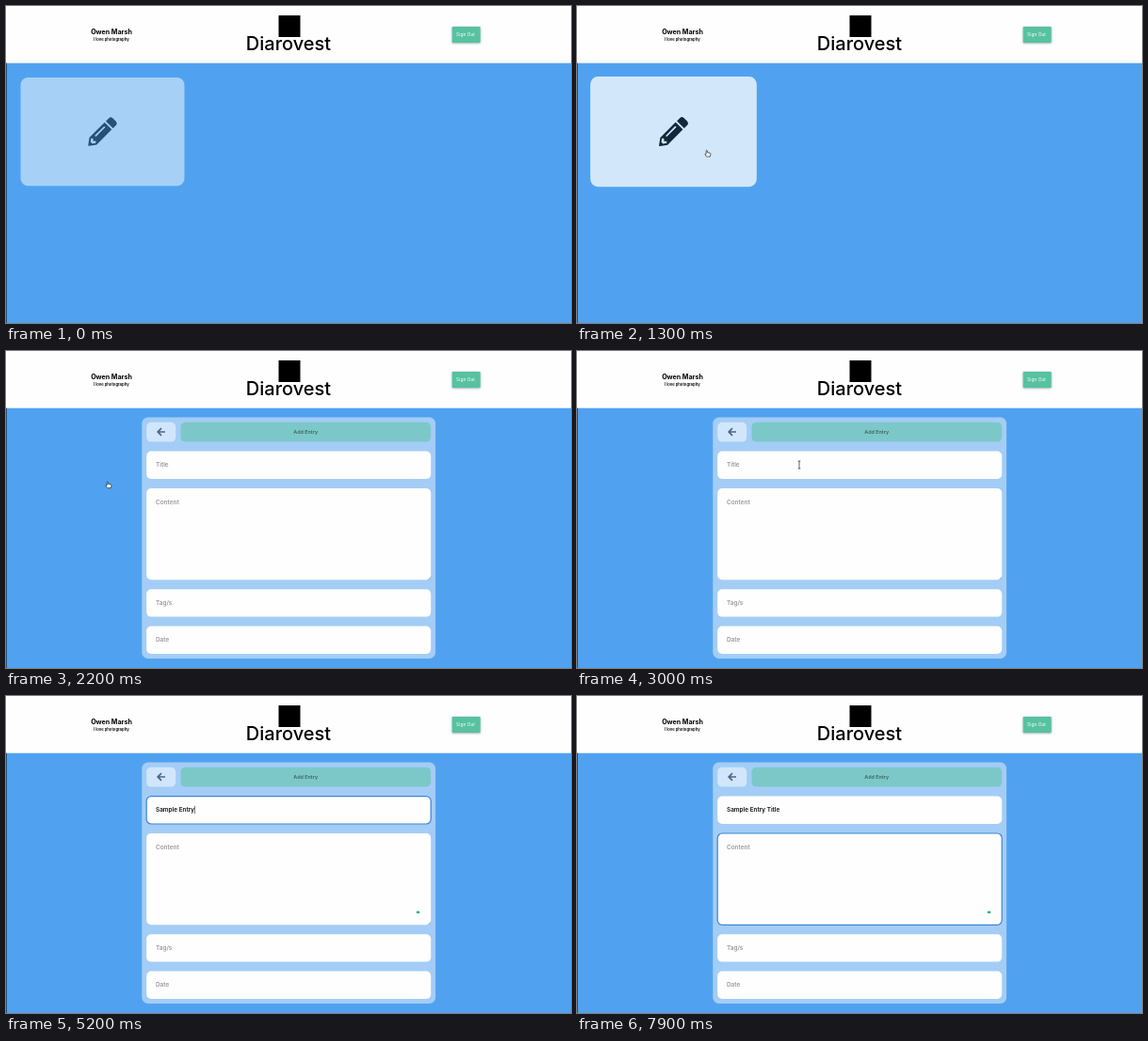
Recreate the animation shown at these times as an HTML page. Size 600x337 px, loop 8000 ms.

```html
<!DOCTYPE html>
<html lang="en">
<head>
<meta charset="utf-8">
<title>Journal entry</title>
<style>
html, body { margin: 0; height: 100%; overflow: hidden; background: #50a2f0; }
svg { display: block; width: 100vw; height: 100vh; }
text { font-family: Inter, "Open Sans", sans-serif; white-space: pre; }
.mid { text-anchor: middle; }
.field rect { fill: #fefefe; }
.field text { font-size: 6.4px; font-weight: 600; fill: #999; }
.focus { fill: none; stroke: #3f83d4; stroke-width: 1.2; }
</style>
</head>
<body>
<svg viewBox="0 0 600 337">
  <defs>
    <filter id="shadow" x="-20%" y="-20%" width="140%" height="150%">
      <feDropShadow dx="0" dy=".6" stdDeviation=".8" flood-opacity=".4"/>
    </filter>
  </defs>
  <rect width="600" height="337" fill="#50a2f0"/>
  <rect width="600" height="60.7" fill="#fefefe"/>
  <rect width=".8" y="60.7" height="277" fill="#1d3a56"/>

  <text class="mid" x="112" y="29.6" font-size="7.1" font-weight="700">Owen Marsh</text>
  <text class="mid" x="111.8" y="37" font-size="4.2" font-weight="600">I love photography</text>
  <rect x="289.5" y="10" width="23" height="23"/>
  <text class="mid" x="300" y="47" font-size="20" font-weight="500">Diarovest</text>
  <rect x="473.7" y="22" width="30" height="17" rx=".8" fill="#56c2a0" filter="url(#shadow)"/>
  <text class="mid" x="488" y="32" font-size="4.9" fill="#fff">Sign Out</text>

  <g id="card">
    <rect x="15.5" y="76" width="174" height="115.3" rx="8" fill="#fefefe"/>
    <g transform="translate(87.3 118.3) scale(.0595)">
      <path d="M292 92 420 219 150 490 14 512Q0 512 0 498L22 362ZM315 69 369 14q34-28 68 0l60 60q28 34 0 68l-54 54Z"/>
      <path d="M134 330 288 176" stroke="#fefefe" stroke-width="28" stroke-linecap="round"/>
      <path d="M88 424h48v36l-64 11-31-31 11-64h36z" fill="#fefefe"/>
    </g>
  </g>

  <g id="form">
    <rect x="144.3" y="70.6" width="311.8" height="256.4" rx="6.5" fill="#a3cdf6"/>
    <rect x="149.2" y="75.8" width="31" height="20.8" rx="5" fill="#d1e6fb"/>
    <path d="M169 86H161.5M165 82.2 161.2 86 165 89.8" fill="none" stroke="#49678a" stroke-width="1.7"/>
    <rect x="185.5" y="75.8" width="265.7" height="20.8" rx="5" fill="#7cc8c9"/>
    <text class="mid" x="318.2" y="88" font-size="5.4" font-weight="600" fill="#3e6465">Add Entry</text>
    <g id="fields" class="field"></g>
    <path d="M448.8 242.4 450.6 240.6M450 242.4 450.6 241.8" stroke="#777" stroke-width=".5"/>
    <rect id="titleFocus" class="focus" x="149.2" y="106.6" width="302" height="29.4" rx="5"/>
    <rect id="bodyFocus" class="focus" x="149.2" y="146" width="302" height="97.3" rx="5"/>
    <ellipse id="badge" cx="437.6" cy="229.9" rx="1.9" ry="1.3" fill="#2bb58c"/>
    <rect id="caret" width=".6" height="8.4" fill="#222"/>
  </g>

  <g id="cursor" stroke="#222" stroke-width=".7" stroke-linejoin="round">
    <path id="arrow" d="M-2-4V4L0 2.2 1.3 5 2.5 4.4 1.2 1.8H3.6Z" fill="#111" stroke="#fff" stroke-width=".6"/>
    <path id="hand" d="M-1.8-3.2Q-1.2-4-.6-3.2V-1.2L2.2-.8Q3.1-.5 3 .6L2.3 3.2H-1.2L-3 .8Q-3-.2-1.8.5Z" fill="#fff"/>
    <path id="beam" d="M-1.3-4H1.3M0-4V4M-1.3 4H1.3" fill="none"/>
  </g>
</svg>
<script>
const $ = id => document.getElementById(id);
const LOOP = 8000, SUBMIT = 2200, FOCUS = 3100, TAB = 7400;
const TITLE = "Sample Entry Title";

// [time, number of title letters present]
const keys = [
  [3800, 1], [3900, 2], [4000, 3], [4100, 4], [4200, 5], [4300, 6], [4500, 7],
  [4700, 8], [4800, 9], [5000, 10], [5100, 11], [5200, 12], [5300, 13],
  [5400, 14], [5500, 15], [5600, 16], [5900, 14], [6000, 13], [6100, 11],
  [6200, 10], [6400, 12], [6500, 13], [6700, 14], [6800, 15], [6900, 16],
  [7000, 17], [7100, 18]
];
// [time, x, y] of the pointer
const path = [
  [400, 366, 324], [700, 293, 257], [900, 293, 257], [1300, 139, 157],
  [1700, 109, 142.5], [2500, 109, 142.5], [3000, 236, 121]
];

$("fields").innerHTML = [
  ["Title", 106.6, 29.4], ["Content", 146, 97.3], ["Tag/s", 253.2, 29.4], ["Date", 292.6, 29.4]
].map(([label, y, h]) =>
  `<rect x="149.2" y="${y}" width="302" height="${h}" rx="5"/>` +
  `<text x="159" y="${y + 16.8}">${label}</text>`).join("");
const title = document.querySelector("#fields text");

const clamp = v => Math.max(0, Math.min(1, v));
const ramp = (t, start, length) => clamp((t - start) / length);
const ease = p => 1 - (1 - p) ** 2.2;
const show = (id, on) => $(id).setAttribute("visibility", on ? "inherit" : "hidden");

function pointAt(t) {
  let i = path.findIndex(p => p[0] > t);
  if (i < 0) return path[path.length - 1].slice(1);
  i = Math.max(i, 1);
  const [a, b] = [path[i - 1], path[i]], k = ramp(t, a[0], b[0] - a[0]);
  return [a[1] + (b[1] - a[1]) * k, a[2] + (b[2] - a[2]) * k];
}

function drawCard(t) {
  const k = ease(ramp(t, 1150, 550));
  $("card").setAttribute("opacity", .5 + .5 * k);
  $("card").setAttribute("transform",
    `translate(102.5 133.6) scale(${1 + .03 * k}) translate(-102.5 -133.6)`);
  show("card", t < SUBMIT);
}

function drawForm(t) {
  show("form", t >= SUBMIT);
  const key = keys.filter(k => k[0] <= t).pop();
  const typed = key ? TITLE.slice(0, key[1]) : "";
  title.textContent = typed || "Title";
  title.style.fill = typed ? "#111" : "";

  const leave = ramp(t, TAB - 60, 200);
  $("titleFocus").setAttribute("opacity", ramp(t, FOCUS - 60, 160) * (1 - leave));
  $("bodyFocus").setAttribute("opacity", leave);
  show("badge", t >= FOCUS);

  const inBody = t >= TAB;
  const since = inBody ? TAB : key ? key[0] : FOCUS;
  const width = typed && !inBody ? title.getComputedTextLength() : 0;
  $("caret").setAttribute("x", 159 + width);
  $("caret").setAttribute("y", inBody ? 156.2 : 116.8);
  show("caret", t >= FOCUS && (t - since) % 1000 < 500);
}

function drawCursor(t) {
  const [x, y] = pointAt(t);
  const hand = t >= 1150 && t < 2300, beam = t >= 2720;
  $("cursor").setAttribute("transform", `translate(${x} ${y})`);
  show("cursor", t >= 400 && t < 3800);
  show("hand", hand);
  show("beam", beam);
  show("arrow", !hand && !beam);
}

function frame() {
  const t = performance.now() % LOOP;
  drawCard(t);
  drawForm(t);
  drawCursor(t);
  requestAnimationFrame(frame);
}
frame();
</script>
</body>
</html>
```
